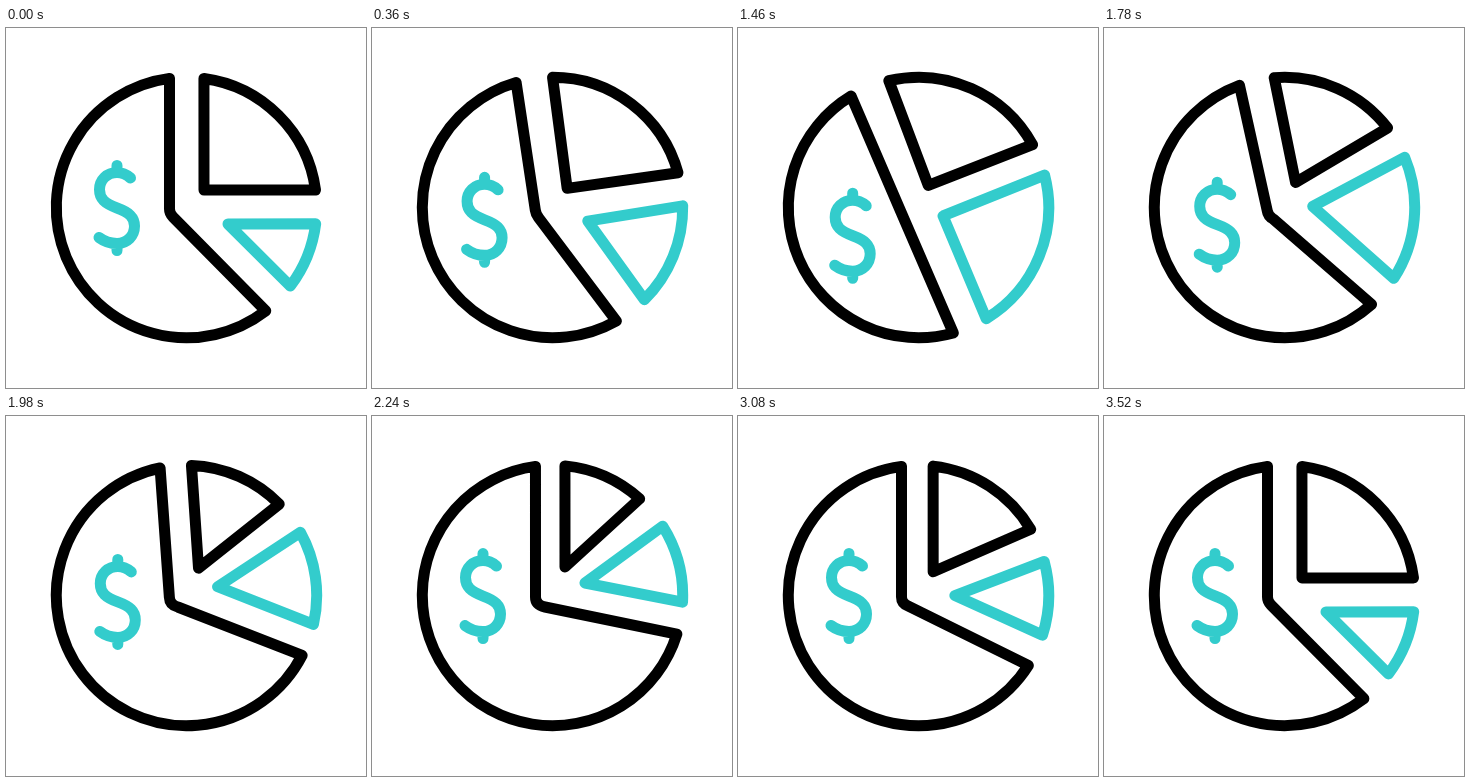
Animation, 360 px wide and 360 px high, one loop 3600 ms. Source, as an HTML page:

```html
<!DOCTYPE html>
<html lang="en">
<head>
<meta charset="utf-8">
<title>Pie chart</title>
<style>
  html, body { margin: 0; width: 100%; height: 100%; overflow: hidden; background: #fff; }
  svg { display: block; width: 100%; height: 100%; }
  path { fill: none; stroke: #000; stroke-width: 11; stroke-linecap: round; stroke-linejoin: round; }
  .accent { stroke: #33cccc; }
</style>
</head>
<body>
<svg viewBox="0 0 360 360">
  <path id="main"/>
  <path id="upper"/>
  <path id="side" class="accent"/>
  <path id="dollar" class="accent" d="M111 137.5V144.5M124.5 150C120.5 146.5 116 144.5 111 144.5
    C101 144.5 93.5 152 93.5 161.5C93.5 171 99 175.5 111 180C123 184.5 128.5 189 128.5 198
    C128.5 208 121 215.5 111 215.5C104 215.5 97 212.5 93 209.5M111 215.5V222.5"/>
</svg>
<script>
const LOOP = 3600, CX = 180.5, CY = 179.5, R = 130.2;

// Angles are in degrees, clockwise from the right.
const poses = [
  { main: [-97.5, 52.5], bend: [163.5, 181, 163.5, 185.5, 167, 189],
    upper: [-82.3, -7.7], upperTip: [198, 162],
    side: [7.2, 37.1], sideTip: [222, 196], drop: [0] },
  { main: [-121.2, 74.6], bend: [163, 184, 164.5, 187.5, 166, 191],
    upper: [-103.2, -28.8], upperTip: [190.3, 157.5],
    side: [-14.4, 58.8], sideTip: [205, 188], drop: [1] },
  { main: [-97.5, 17.2], bend: [163.5, 181, 163.5, 189, 173, 191],
    upper: [-84.5, -48], upperTip: [193, 151],
    side: [-32.2, 2.9], sideTip: [213, 167], drop: [0] }
];
const moves = [
  { start: 0, end: 1000, from: 0, to: 1 },
  { start: 1440, end: 2260, from: 1, to: 2 },
  { start: 2770, end: 3550, from: 2, to: 0 }
];

const bezier = (a, b, u) => 3 * a * u * (1 - u) ** 2 + 3 * b * u * u * (1 - u) + u ** 3;

function ease(x) {
  if (x <= 0 || x >= 1) return Math.min(1, Math.max(0, x));
  let lo = 0, hi = 1;
  for (let i = 0; i < 24; i++) {
    const mid = (lo + hi) / 2;
    if (bezier(0.333, 0.5, mid) < x) lo = mid; else hi = mid;
  }
  return bezier(0, 1, lo);
}

function poseAt(t) {
  const move = moves.filter(m => t >= m.start).pop();
  const p = ease((t - move.start) / (move.end - move.start));
  const a = poses[move.from], b = poses[move.to], pose = {};
  for (const key in a) pose[key] = a[key].map((v, i) => v + (b[key][i] - v) * p);
  return pose;
}

function rim(deg) {
  const a = deg * Math.PI / 180;
  return `${CX + R * Math.cos(a)} ${CY + R * Math.sin(a)}`;
}

const slice = ([a, b], tip) => `M${tip}L${rim(a)}A${R} ${R} 0 0 1 ${rim(b)}Z`;

function mainSlice([top, end], [x1, y1, cx, cy, x2, y2]) {
  const large = end - top < 180 ? 1 : 0;
  return `M${rim(end)}A${R} ${R} 0 ${large} 1 ${rim(top)}L${x1} ${y1}Q${cx} ${cy} ${x2} ${y2}Z`;
}

const el = id => document.getElementById(id);
const main = el("main"), upper = el("upper"), side = el("side"), dollar = el("dollar");

function draw(t) {
  const pose = poseAt(t);
  main.setAttribute("d", mainSlice(pose.main, pose.bend));
  upper.setAttribute("d", slice(pose.upper, pose.upperTip));
  side.setAttribute("d", slice(pose.side, pose.sideTip));
  const d = pose.drop[0], shift = d * (1.25 - 0.25 * d);
  dollar.setAttribute("transform", `translate(${3.7 * shift} ${27.8 * shift})`);
}

const began = performance.now();
function tick() {
  draw((performance.now() - began) % LOOP);
  requestAnimationFrame(tick);
}
draw(0);
requestAnimationFrame(tick);
</script>
</body>
</html>
```
